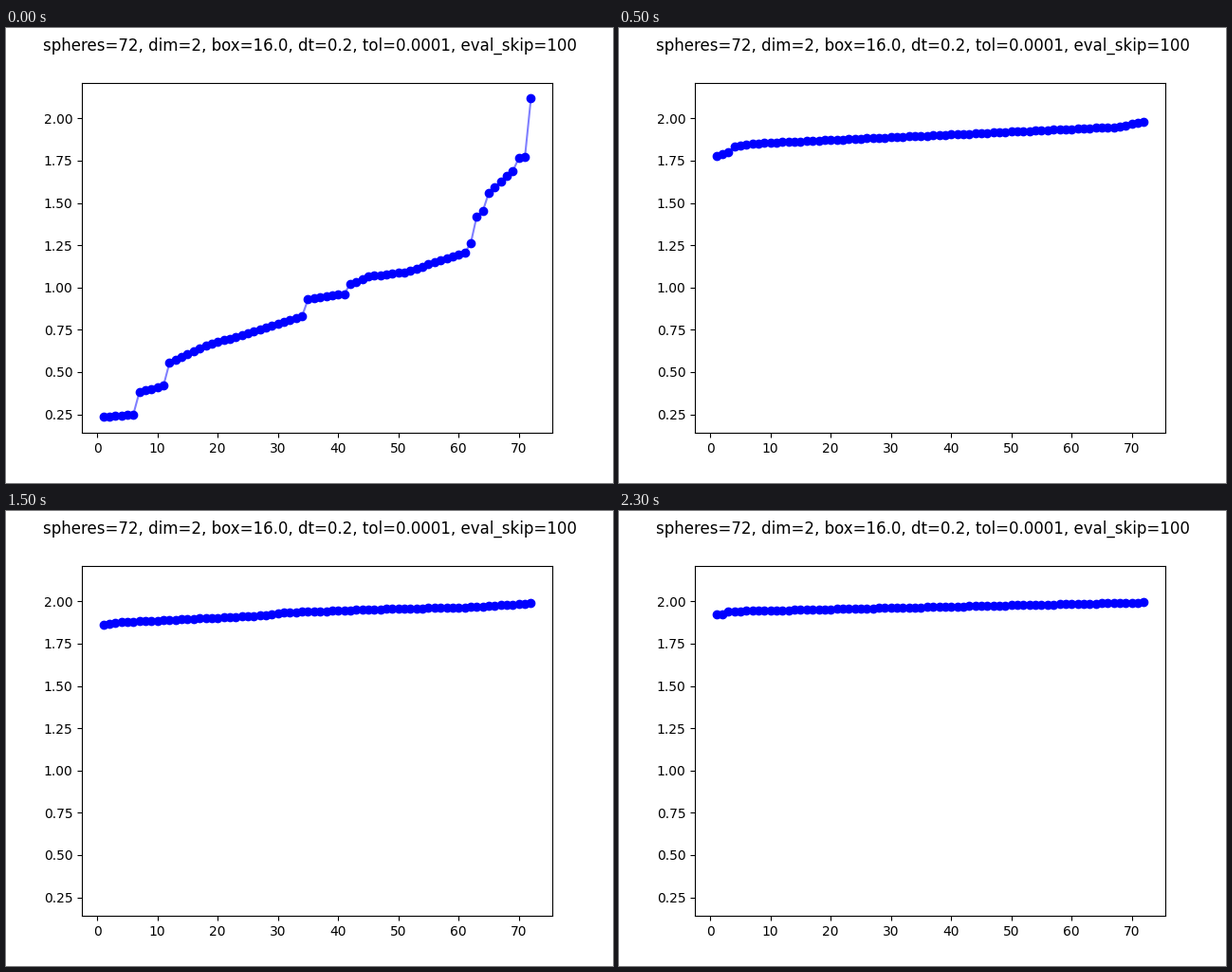
These frames come from a looping animation (640 px wide and 480 px high, 2.5 s). A matplotlib script:

```python
import numpy as np
import matplotlib.pyplot as plt
from matplotlib.animation import FuncAnimation

COUNT = 72
x = np.arange(1, COUNT + 1)

# Key points (rank, value) of each sorted curve, joined by straight ramps
RELAXING = [
    [(1, 1.78), (3, 1.8), (4, 1.835), (8, 1.853), (34, 1.895), (68, 1.95),
     (72, 1.982)],
    [(1, 1.827), (10, 1.857), (18, 1.894), (28, 1.917), (44, 1.927),
     (72, 1.992)],
    [(1, 1.86), (4, 1.877), (28, 1.917), (31, 1.934), (45, 1.952),
     (63, 1.967), (72, 1.99)],
    [(1, 1.922), (2, 1.922), (3, 1.941), (72, 1.994)],
]
INITIAL = [
    (1, .234), (6, .25), (7, .382), (11, .42), (12, .555), (18, .655),
    (26, .742), (34, .83), (35, .93), (41, .962), (42, 1.02), (45, 1.065),
    (51, 1.09), (61, 1.205), (62, 1.26), (63, 1.42), (64, 1.45), (65, 1.56),
    (69, 1.69), (70, 1.765), (71, 1.77), (72, 2.1176),
]


def ramp(keys):
    return np.interp(x, *zip(*keys))


curves = [ramp(keys) for keys in [INITIAL, *RELAXING]]

plt.rcParams["font.family"] = "DejaVu Sans"
fig, ax = plt.subplots(figsize=(6.4, 4.8), dpi=100)
fig.suptitle("spheres=72, dim=2, box=16.0, dt=0.2, tol=0.0001, eval_skip=100")
line, = ax.plot(x, curves[0], "b-", alpha=0.5)
dots, = ax.plot(x, curves[0], "bo")
# Keep the first curve's limits for the whole loop
ax.set_xlim(ax.get_xlim())
ax.set_ylim(ax.get_ylim())


def update(i):
    for artist in (line, dots):
        artist.set_ydata(curves[i])
    return line, dots


anim = FuncAnimation(fig, update, frames=len(curves), interval=500,
                     repeat=True, repeat_delay=0)
plt.show()
```
